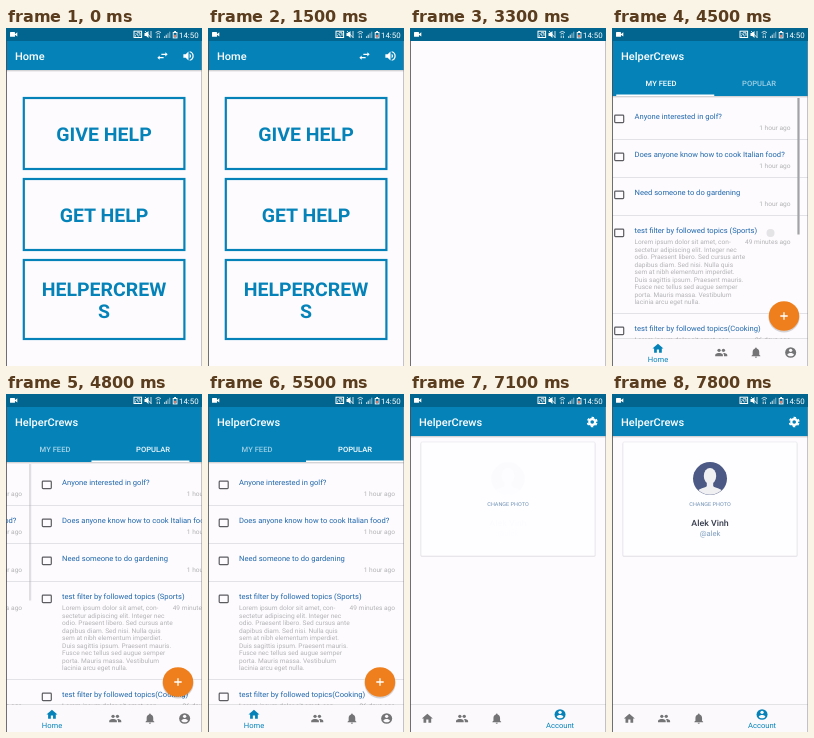
These frames come from a looping animation (196x338 px, 8000 ms). An HTML page:

```html
<!DOCTYPE html>
<html lang="en">
<head>
<meta charset="utf-8">
<title>Helper app walkthrough</title>
<style>
html, body { margin: 0; width: 100%; height: 100%; overflow: hidden; background: #fdfbfe; }
svg { display: block; width: 196px; height: 338px; font-family: Roboto, sans-serif; text-rendering: geometricPrecision; }
</style>
</head>
<body>
<svg id="stage" viewBox="0 0 196 338"></svg>
<script>
const LOOP = 8000;
const ASPECT = .97; // the phone screen is shown slightly flattened
const BLUE = '#0583b9', DARK = '#01658f', PAGE = '#fdfbfe', GREY = '#747476';
const svg = document.getElementById('stage');
const $ = id => document.getElementById(id);

const rect = (x, y, w, h, fill, more = '') =>
  `<rect x="${x}" y="${y}" width="${w}" height="${h}" fill="${fill}" ${more}/>`;
const text = (x, y, size, fill, str, more = '') =>
  `<text transform="translate(${x} ${y}) scale(1 ${ASPECT})" font-size="${size}" fill="${fill}" ${more}>${str}</text>`;
const group = (id, body, more = '') => `<g id="${id}" ${more}>${body}</g>`;
const icon = (body, x, y, s, fill = '#fff') =>
  `<g transform="translate(${x} ${y}) scale(${s} ${s * ASPECT}) translate(-12 -12)" fill="${fill}">${body}</g>`;
const path = d => `<path d="${d}"/>`;
const MID = 'text-anchor="middle"', END = 'text-anchor="end"';

// Icons on a 24-unit grid
const ICON = {
  home: path('M10 20v-6h4v6h5v-8h3L12 3 2 12h3v8z'),
  people: '<circle cx="8" cy="8" r="3"/><circle cx="16" cy="8" r="3"/>' +
    path('M8 13c-2.33 0-7 1.17-7 3.5V19h14v-2.5c0-2.33-4.67-3.5-7-3.5z') +
    path('M16 13l-1 .05c1.2.84 2 1.97 2 3.45V19h6v-2.5c0-2.33-4.67-3.5-7-3.5z'),
  bell: path('M12 22a2 2 0 0 0 2-2h-4a2 2 0 0 0 2 2zM18 16v-5c0-3.07-1.64-5.64-4.5-6.32V4a1.5 1.5 0 0 0-3 0v.68C7.63 5.36 6 7.92 6 11v5l-2 2v1h16v-1z'),
  account: '<circle cx="12" cy="12" r="10"/><circle cx="12" cy="8" r="3" fill="#fbf9fc"/>' +
    '<path fill="#fbf9fc" d="M12 19.2c-2.5 0-4.7-1.3-6-3.2 0-2 4-3.1 6-3.1s6 1.1 6 3.1c-1.3 1.9-3.5 3.2-6 3.2z"/>',
  swap: path('M7 11L3 15l4 4v-3h7v-2H7zM21 9l-4-4v3h-7v2h7v3z'),
  sound: path('M3 9v6h4l5 5V4L7 9zM16.5 12A4.5 4.5 0 0 0 14 8v8a4.5 4.5 0 0 0 2.5-4zM14 3.2v2.1a7 7 0 0 1 0 13.4v2.1a9 9 0 0 0 0-17.6z'),
  gear: '<circle cx="12" cy="12" r="5.4" fill="none" stroke="#fff" stroke-width="4"/>' +
    '<circle cx="12" cy="12" r="8.6" fill="none" stroke="#fff" stroke-width="3" stroke-dasharray="4.5 4.505" transform="rotate(15 12 12)"/>'
};

function statusBar() {
  const signal = [0, 1, 2, 3].map(i =>
    rect(158 + i * 1.7, 8.2 - i * 1.5, 1.2, 1.8 + i * 1.5, '#fff', `opacity="${i < 2 ? .7 : .45}"`)).join('');
  return rect(0, 0, 196, 13, DARK) +
    rect(4, 4, 5, 4.8, '#fff', 'rx=".6"') + '<path d="M8.5 6.4L11.3 4.2v4.4z" fill="#fff"/>' +
    rect(128, 3.2, 7.6, 6.3, 'none', 'stroke="#fff" stroke-width="1"') +
    '<path d="M129.5 8.5v-1.2M129.5 5.7a2.8 2.8 0 0 1 2.8 2.8M131 4.8h3v3" fill="none" stroke="#fff" stroke-width=".9"/>' +
    '<path d="M138.5 5h1.7l2.3-2v7l-2.3-2h-1.7z" fill="#fff"/>' +
    '<path d="M139 3l6.5 7M145 3v6.5" stroke="#fff" stroke-width=".8"/>' +
    '<path d="M149.6 4.6a4 4 0 0 1 5.4 0M150.7 6.2a2.4 2.4 0 0 1 3.2 0" fill="none" stroke="#fff" stroke-width=".8"/>' +
    '<path d="M151.2 7.6v2.400M153.400 7.600v2.400" stroke="#fff" stroke-width=".8"/>' + signal +
    rect(167.2, 4.5, 3.8, 5.4, DARK, 'stroke="#fff" stroke-width=".9"') +
    rect(168.2, 3, 1.8, 1.2, '#fff') + rect(168.1, 6.8, 2, 2.4, '#e0806c') +
    text(173, 9.5, 7.9, '#fff', '14:50');
}

function shade(y) {
  return rect(0, y, 196, 1, '#000', 'opacity=".16"') + rect(0, y + 1, 196, 1, '#000', 'opacity=".06"');
}

const toolbar = title => rect(0, 13, 196, 29, BLUE) +
  text(9, 32, 11, '#fff', title, 'font-weight="500"');

function homeScreen() {
  const frame = (y, h) => rect(17.8, y + 1, 160.6, h - 2, PAGE, `stroke="${BLUE}" stroke-width="2.2"`);
  const label = (y, str) => text(98, y, 19.5, BLUE, str, MID + ' font-weight="700"');
  return rect(0, 13, 196, 325, PAGE) + shade(42) + toolbar('Home') +
    icon(ICON.swap, 156.5, 28, .57) + icon(ICON.sound, 182.5, 28, .57) +
    frame(69, 73) + frame(150, 73) + frame(231, 81) +
    rect(19, 233, 158, 77, '#000', 'id="press" opacity="0"') +
    label(112.8, 'GIVE HELP') + label(193.8, 'GET HELP') + label(267.7, 'HELPERCREW') + label(290, 'S');
}

const LOREM = ['Lorem ipsum dolor sit amet, con-', 'sectetur adipiscing elit. Integer nec',
  'odio. Praesent libero. Sed cursus ante', 'dapibus diam. Sed nisi. Nulla quis',
  'sem at nibh elementum imperdiet.', 'Duis sagittis ipsum. Praesent mauris.',
  'Fusce nec tellus sed augue semper', 'porta. Mauris massa. Vestibulum', 'lacinia arcu eget nulla.'];

function row(y, title, age, body) {
  const lines = body ? LOREM.map((s, i) => text(31, y + 29 + i * 7.55, 6.6, '#b3b2b5', s)).join('') : '';
  return rect(11.2, y + 14.2, 9, 7.4, 'none', 'rx=".8" stroke="#5c5c60" stroke-width="1.2"') +
    text(31, y + 17.5, 7.6, '#2067ab', title) + lines +
    text(187, y + (body ? 28.5 : 29), 6.6, '#b3b2b5', age, END) +
    rect(0, y + (body ? 98 : 38), 196, .8, '#dedce1');
}

function list(x) {
  return `<g transform="translate(${x} 0)">` +
    row(73, 'Anyone interested in golf?', '1 hour ago') +
    row(111, 'Does anyone know how to cook Italian food?', '1 hour ago') +
    row(149, 'Need someone to do gardening', '1 hour ago') +
    row(187, 'test filter by followed topics (Sports)', '49 minutes ago', true) +
    row(285, 'test filter by followed topics(Cooking)', '26 days ago', true) + '</g>';
}

function feedScreen() {
  const tab = (id, x, str) => text(x, 58, 7.6, '#fff', str, `id="${id}" ${MID} font-weight="500"`);
  const strip = list(0) + list(196) + rect(193.9, 70, 2.2, 136.5, '#a3a2a6', 'id="bar"');
  const fab = '<ellipse cx="172" cy="289.3" rx="15.6" ry="15.2" opacity=".16"/>' +
    '<ellipse cx="172" cy="288" rx="15.2" ry="14.8" fill="#ef7f1d"/>' +
    '<path d="M168.3 288h7.4M172 284.3v7.4" stroke="#fff" stroke-width="1.3"/>';
  return group('strip', strip) + shade(68) + rect(0, 42, 196, 26, BLUE) +
    tab('tab0', 49, 'MY FEED') + tab('tab1', 147, 'POPULAR') +
    rect(0, 66.5, 98, 1.5, '#fff', 'id="line"') + group('fab', fab) +
    '<circle id="touch" r="4" fill="#8c8b90" opacity="0"/>';
}

function profileScreen() {
  const user = '<ellipse cx="98" cy="84.6" rx="17" ry="16.5" fill="#4c5985"/>' +
    '<clipPath id="disc"><ellipse cx="98" cy="84.6" rx="16.6" ry="16.1"/></clipPath>' +
    '<g clip-path="url(#disc)" fill="#f0f0f2"><ellipse cx="98" cy="82" rx="6.2" ry="8"/>' +
    '<path d="M94.8 87h6.4v5c1 2 8.5 2.2 10 6V103H84.8V98c1.5-3.8 9-4 10-6z"/></g>' +
    text(98, 131.5, 8.8, '#343b4b', 'Alek Vinh', MID + ' font-weight="500"') +
    text(98, 142, 7.6, '#7d9dbd', '@alek', MID);
  return rect(10.5, 48.5, 175, 114.5, '#000', 'rx="1.5" opacity=".08"') +
    rect(11, 48, 174, 114, '#fefdff', 'rx="1" stroke="#e4e2e7" stroke-width=".6"') +
    text(98, 112.3, 5.5, '#7193b6', 'CHANGE PHOTO', MID) + group('user', user);
}

const TABS = [['home', 'Home'], ['people', 'Users'], ['bell', ''], ['account', 'Account']];

function navBar() {
  const items = TABS.map(([name, label], i) => group('nav' + i, group('ic' + i, icon(ICON[name], 0, 0, .55, 'currentColor')) +
    text(0, 334, 7.6, BLUE, label, `id="lb${i}" ${MID}`))).join('');
  return rect(0, 310, 196, 1, '#000', 'opacity=".1"') + rect(0, 311, 196, 27, '#fbf9fc') + items;
}

svg.innerHTML = rect(0, 0, 196, 338, PAGE) + group('home', homeScreen()) +
  group('blank', rect(0, 13, 196, 325, PAGE)) +
  group('app', rect(0, 13, 196, 325, PAGE) + group('feed', feedScreen()) +
    group('profile', profileScreen()) + group('topShade', shade(42)) + toolbar('HelperCrews') +
    group('gear', icon(ICON.gear, 182.2, 28, .54)) + navBar()) +
  rect(0, 13, .8, 325, '#4c4c50') + rect(195.5, 13, .5, 325, '#8a898e') + statusBar();

const clamp = v => Math.max(0, Math.min(1, v));
const prog = (t, a, b) => clamp((t - a) / (b - a));
const ease = p => p * p * (3 - 2 * p);
const out = p => 1 - (1 - p) ** 3;
const set = (id, name, v) => $(id).setAttribute(name, v);
const show = (id, on) => set(id, 'display', on ? 'inline' : 'none');

const OPEN = 3000, LOAD = 3700, USERS = 5750, ACCOUNT = 6750;

function drawNav(t) {
  const a = ease(prog(t, USERS, USERS + 220)), b = ease(prog(t, ACCOUNT, ACCOUNT + 220));
  const weights = [1 - a, a - b, 0, b];
  let x = 0;
  weights.forEach((w, i) => {
    const width = 34.7 + 57.2 * w;
    set('nav' + i, 'transform', `translate(${x + width / 2} 0)`);
    set('ic' + i, 'transform', `translate(0 ${324.5 - 4 * w})`);
    set('ic' + i, 'color', w > .5 ? BLUE : GREY);
    set('lb' + i, 'opacity', clamp(w * 2 - 1));
    x += width;
  });
}

// Finger drag first, then the pager settles on the second page.
function swipe(t) {
  if (t < 4500) return 8 * prog(t, 4420, 4500);
  if (t < 4700) return 8 + 102 * prog(t, 4500, 4700);
  return 110 + 86 * out(prog(t, 4700, 5000));
}

function drawFeed(t) {
  const shift = swipe(t), p = shift / 196;
  show('strip', t >= 3900);
  set('strip', 'transform', `translate(${-shift} 0)`);
  set('line', 'x', 98 * p);
  set('tab0', 'opacity', 1 - .4 * p);
  set('tab1', 'opacity', .6 + .4 * p);
  set('bar', 'opacity', 1 - prog(t, 4600, 4900));
  set('touch', 'cx', 167 - shift);
  set('touch', 'cy', 205);
  set('touch', 'opacity', t >= 4380 && t < 4700 ? .22 : 0);
}

function draw(t) {
  const open = out(prog(t, OPEN, OPEN + 220));
  set('press', 'opacity', .1 * prog(t, 2800, 2950));
  show('home', t < OPEN + 220);
  show('blank', t >= OPEN);
  set('blank', 'opacity', open);
  set('blank', 'transform', `translate(0 ${27 * (1 - open)})`);
  show('app', t >= LOAD);
  show('feed', t < USERS + 100);
  show('topShade', t >= USERS + 100);
  show('profile', t >= ACCOUNT + 100);
  show('gear', t >= ACCOUNT + 100);
  set('user', 'opacity', prog(t, 7100, 7250));
  drawFeed(t);
  drawNav(t);
}

const start = performance.now();
function tick() {
  draw((performance.now() - start) % LOOP);
  requestAnimationFrame(tick);
}
tick();
</script>
</body>
</html>
```
